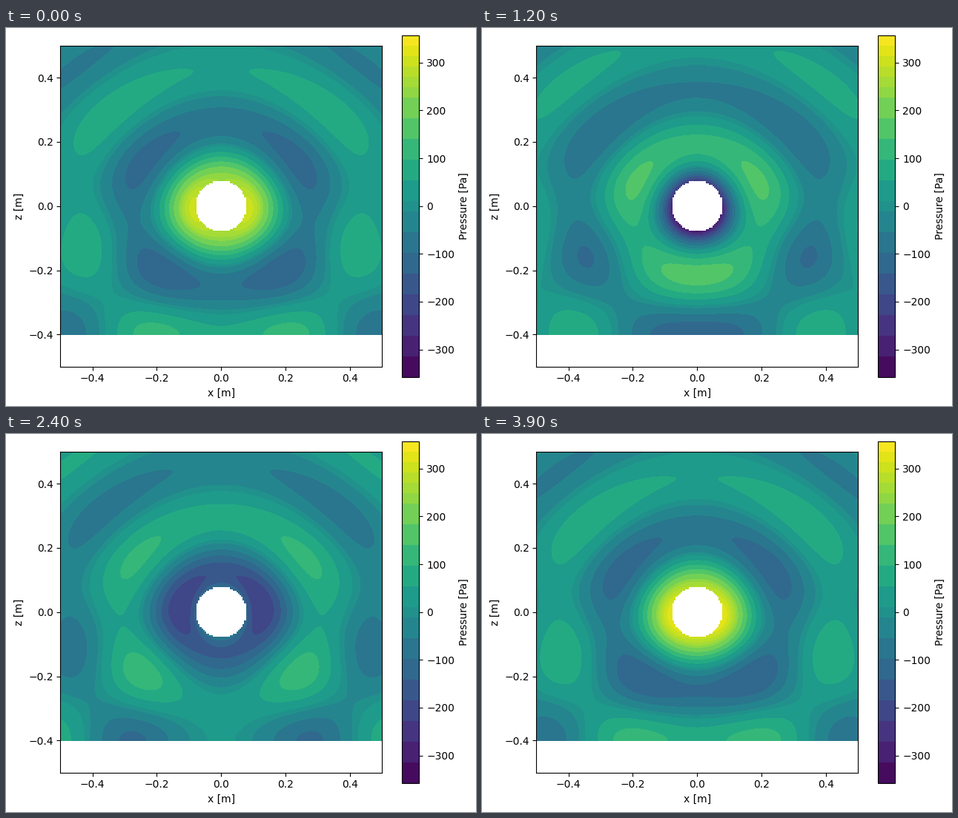
A matplotlib script that plays this animation: 634 px wide and 511 px high, repeating every 4 s.

```python
import numpy as np
import matplotlib.pyplot as plt
from matplotlib.animation import FuncAnimation

W, H, DPI = 634, 511, 100
FRAMES, INTERVAL = 40, 100

RADIUS = 0.08          # pulsating sphere
GROUND = -0.4          # rigid plane below it
K = 2 * np.pi * 1000 / 343
LIMIT = 357.5          # end of the colour scale
SURFACE_PEAK = 372     # strongest pressure on the sphere
ORDERS = 8

# Symmetric steps, halved towards the bright end
LEVELS = LIMIT / 33 * np.concatenate([
    np.arange(-33, 0, 4), np.arange(1, 21, 4), np.arange(21, 34, 2)])


def modes(x, z):
    """Outgoing axisymmetric spherical waves around the origin."""
    r = np.maximum(np.hypot(x, z), 0.9 * RADIUS)
    c, kr = z / r, K * r
    wave = np.exp(-1j * kr) / kr
    h = [1j * wave, -wave * (1 - 1j / kr)]
    p = [np.ones_like(c), c]
    for n in range(1, ORDERS - 1):
        h.append((2 * n + 1) / kr * h[n] - h[n - 1])
        p.append(((2 * n + 1) * c * p[n] - n * p[n - 1]) / (n + 1))
    return np.array([a * b for a, b in zip(h, p)])


def basis(x, z):
    """Each wave together with its mirror image below the ground."""
    return modes(x, z) + modes(x, 2 * GROUND - z)


def solve_weights():
    """Uniform normal velocity on the surface of the sphere."""
    theta = (np.arange(40) + 0.5) * np.pi / 40
    s, c = np.sin(theta), np.cos(theta)
    eps = 1e-5
    outer, inner = RADIUS + eps, RADIUS - eps
    slope = (basis(outer * s, outer * c) - basis(inner * s, inner * c)) / (2 * eps)
    rhs = np.full(theta.size, -1j * K)
    weights = np.linalg.lstsq(slope.T, rhs, rcond=None)[0]
    surface = np.tensordot(weights, basis(RADIUS * s, RADIUS * c), axes=1)
    return weights * SURFACE_PEAK / np.abs(surface).max()


axis = np.linspace(-0.5, 0.5, 200)
X, Z = np.meshgrid(axis, axis)
hidden = (np.hypot(X, Z) < 0.0765) | (Z < GROUND)
field = np.tensordot(solve_weights(), basis(X, Z), axes=1)


def pressure(i):
    p = np.real(field * np.exp(2j * np.pi * i / FRAMES))
    return np.ma.array(np.clip(p, -LIMIT + 0.01, LIMIT - 0.01), mask=hidden)


def box(left, top, width, height):
    return [left / W, 1 - (top + height) / H, width / W, height / H]


fig = plt.figure(figsize=(W / DPI, H / DPI), dpi=DPI, facecolor="white")
ax = fig.add_axes(box(73.28, 23.72, 434, 434))
cax = fig.add_axes(box(534.4, 9.72, 23.08, 462))


def draw_field(i):
    return ax.contourf(X, Z, pressure(i), levels=LEVELS, cmap="viridis",
                       vmin=-LIMIT, vmax=LIMIT, corner_mask=False)


current = draw_field(0)
bar = fig.colorbar(current, cax=cax, spacing="proportional",
                   ticks=np.arange(-300, 301, 100))
bar.set_label("Pressure [Pa]")

ticks = [-0.4, -0.2, 0.0, 0.2, 0.4]
ax.set(xlim=(-0.5, 0.5), ylim=(-0.5, 0.5), xticks=ticks, yticks=ticks,
       xlabel="x [m]", ylabel="z [m]")


def update(i):
    global current
    current.remove()
    current = draw_field(i)
    return [current]


anim = FuncAnimation(fig, update, frames=FRAMES, interval=INTERVAL,
                     repeat=True, repeat_delay=0, blit=False)
plt.show()
```
